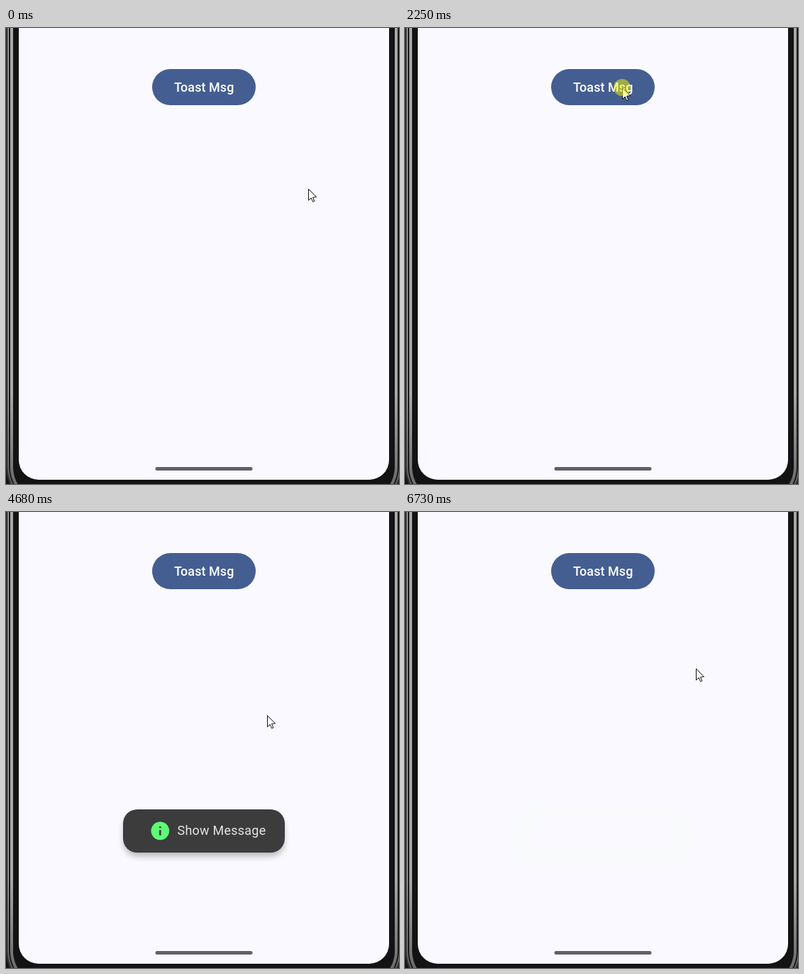
Write an HTML page that moves like this. It is 554 px wide and 644 px high and loops after 7130 ms.

```html
<!DOCTYPE html>
<html lang="en">
<head>
<meta charset="utf-8">
<title>Toast message</title>
<style>
  html, body { margin: 0; width: 100%; height: 100%; overflow: hidden; background: #141414; }
  #stage { position: relative; width: 554px; height: 644px; overflow: hidden; font-family: Roboto, sans-serif; }
  #stage > * { position: absolute; }
  #phone { left: 0; top: 0; }
  #button {
    left: 206px; top: 58px; width: 146px; height: 51px; border-radius: 25.5px; overflow: hidden;
    background: #445e91; color: #fff; font-weight: 500; font-size: 17.9px; line-height: 51px;
    letter-spacing: .1px; text-indent: .4px; text-align: center;
  }
  #button span { position: relative; }
  #ripple { position: absolute; left: 100px; top: 26px; border-radius: 50%; background: #fff; transform: translate(-50%, -50%); }
  #toast {
    left: 165px; top: 420px; width: 228px; height: 61px; border-radius: 20px;
    background: #3c3c3c; box-shadow: 0 6px 9px -1px rgba(0, 0, 0, .27);
  }
  #toast svg { position: absolute; left: 36.6px; top: 15px; }
  #toast span {
    position: absolute; left: 76.5px; top: 0; line-height: 60px; white-space: nowrap;
    color: #e4e4e6; font-size: 17.9px; letter-spacing: .3px;
  }
  #residue {
    left: 152px; top: 416px; width: 256px; height: 88px; box-sizing: border-box; border-radius: 40px;
    border: solid #f9fafb; border-width: 11px 31px 28px 28px;
  }
  #cursor { left: 0; top: 0; }
  #click { left: -12px; top: -12px; width: 24px; height: 24px; border-radius: 50%; background: rgba(255, 255, 0, .48); }
</style>
</head>
<body>
<div id="stage">
  <svg id="phone" width="554" height="644">
    <defs>
      <linearGradient id="metal" gradientUnits="userSpaceOnUse" x1="0" y1="0" x2="0" y2="644">
        <stop offset=".8" stop-color="#a8a8a8"/>
        <stop offset="1" stop-color="#6c6c6c"/>
      </linearGradient>
    </defs>
    <g id="rims"></g>
    <rect x="18" y="-60" width="522" height="698" rx="28" fill="#faf9ff"/>
    <rect x="210.5" y="620" width="137" height="5" rx="2.5" fill="#626265"/>
  </svg>
  <div id="button"><div id="ripple"></div><span>Toast Msg</span></div>
  <div id="residue"></div>
  <div id="toast">
    <svg width="30.7" height="30.7" viewBox="0 0 24 24">
      <circle cx="12" cy="12" r="10" fill="#5dfd76"/>
      <path d="M11 11h2v6h-2zM11 7h2v2h-2z" fill="#3c3c3c"/>
    </svg>
    <span>Show Message</span>
  </div>
  <svg id="cursor" width="14" height="21">
    <path d="M.5 .5V16.5L4.2 13L6.6 18.5L8.8 17.6L6.5 12.2L11.5 11.7Z" fill="#fff" stroke="#111"/>
  </svg>
  <div id="click"></div>
</div>
<script>
const LOOP = 7130, FRAME = 70;
const $ = id => document.getElementById(id);
const clamp = v => Math.min(1, Math.max(0, v));
const progress = (t, start, length) => clamp((t - start) / length);

const easeIn = k => p => p ** k;
const easeOut = k => p => 1 - (1 - p) ** k;
const easeInOut = p => p * p * (3 - 2 * p);

// One rim of the phone body, `gap` pixels outside the screen
const rim = (gap, fill) =>
  `<rect x="${18 - gap}" y="-100" width="${522 + 2 * gap}" height="${760 + gap}" rx="${40 + gap}" fill="${fill}"/>`;
$('rims').innerHTML = rim(18, '#303030') + rim(15.5, 'url(#metal)') + rim(14, '#1a1a1a')
  + rim(12, 'url(#metal)') + rim(8, '#131313');

// Pointer glides; `bend` bows the path sideways
const home = [426, 227];
const glides = [
  { start: 0, end: 260, to: [421, 226], ease: easeInOut },
  { start: 650, end: 2180, to: [306, 84], ease: easeOut(1.8), bend: [-13, 13] },
  { start: 2320, end: 2960, to: [366, 214], ease: easeIn(1.5), bend: [-37, -10] },
  { start: 3340, end: 3550, to: [376, 224], ease: easeInOut },
  { start: 4610, end: 4950, to: [346, 459], ease: easeOut(1.6) },
  { start: 5080, end: 5780, to: [410, 221], ease: easeInOut, bend: [-75, 0] }
];
const clicks = [2250, 4080];

function pointerAt(t) {
  let from = home;
  for (const { start, end, to, ease, bend = [0, 0] } of glides) {
    const snapped = end - Math.ceil((end - t) / FRAME) * FRAME;
    const s = ease(progress(snapped, start, end - start));
    const here = from.map((v, i) => v + (to[i] - v) * s + 2 * s * (1 - s) * bend[i]);
    if (t < end) return here.map(Math.round);
    from = to;
  }
  return from;
}

function render(t) {
  const [x, y] = pointerAt(t);
  $('cursor').style.transform = $('click').style.transform = `translate(${x}px, ${y}px)`;
  $('click').style.opacity = clicks.some(at => t >= at && t < at + FRAME) ? 1 : 0;

  const enter = progress(t, 2580, 150), exit = progress(t, 6625, 75);
  const alpha = enter * (1 - exit);
  const toast = $('toast').style;
  toast.opacity = alpha;
  toast.transform = `scale(${.8 + .2 * easeOut(2)(enter) * (1 - exit)})`;
  toast.clipPath = alpha < 1 ? 'inset(0)' : 'none';  // a fading layer cuts off its shadow

  const ripple = $('ripple').style;
  ripple.width = ripple.height = 260 * progress(t, 2400, 225) + 'px';
  ripple.opacity = .1 * (1 - progress(t, 2700, 250));

  $('residue').style.opacity = t >= 6730 ? 1 : 0;
}

const origin = performance.now();
function tick() {
  render((performance.now() - origin) % LOOP);
  requestAnimationFrame(tick);
}
tick();
</script>
</body>
</html>
```
